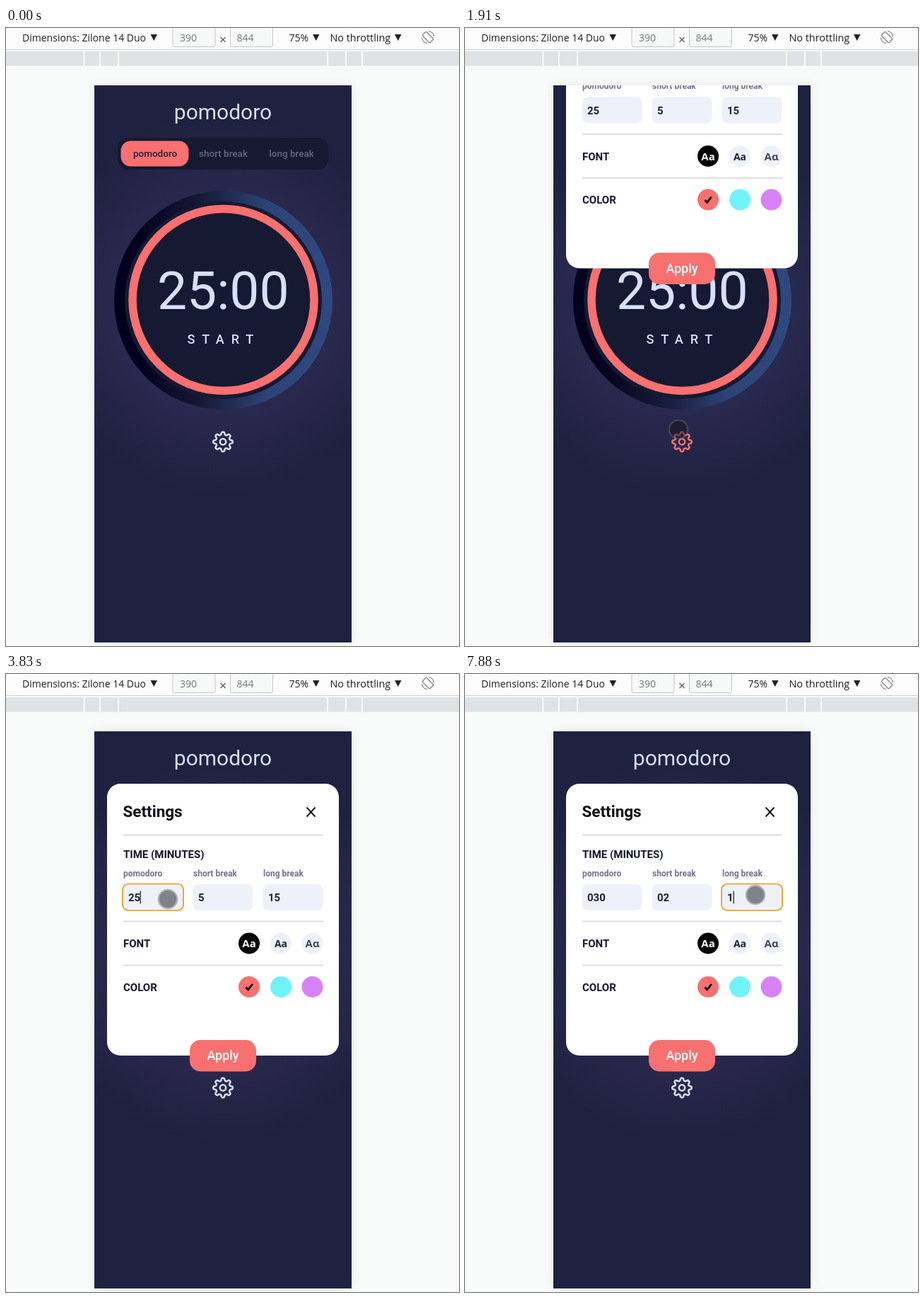
Write an HTML page that moves like this. It is 641 px wide and 873 px high and loops after 8 s.

```html
<!DOCTYPE html>
<html lang="en">
<head>
<meta charset="utf-8">
<title>Pomodoro settings</title>
<style>
html, body { margin: 0; width: 100%; height: 100%; overflow: hidden; background: #f9fbfa; }
svg { display: block; width: 100vw; height: 100vh; font-family: Roboto, sans-serif; }
.bar { font: 14px "Open Sans", sans-serif; fill: #202124; }
.bar .dim { fill: #73767a; }
.tab { font-size: 13.5px; font-weight: 500; fill: #686782; text-anchor: middle; }
.head { font-size: 15px; font-weight: 600; fill: #15172b; }
.label { font-size: 12px; font-weight: 700; fill: #73738a; }
.value { font-size: 15px; font-weight: 700; fill: #1e2138; }
.aa { font-size: 15px; font-weight: 700; text-anchor: middle; }
</style>
</head>
<body>
<svg viewBox="0 0 641 873" preserveAspectRatio="none">
  <defs>
    <radialGradient id="glow" gradientUnits="userSpaceOnUse" cx="307" cy="390" r="270">
      <stop offset="0" stop-color="#2f2f5e"/>
      <stop offset=".55" stop-color="#29294f"/>
      <stop offset="1" stop-color="#1e213f"/>
    </radialGradient>
    <linearGradient id="rim">
      <stop offset="0" stop-color="#02001f"/>
      <stop offset=".12" stop-color="#03011f"/>
      <stop offset=".4" stop-color="#161a36"/>
      <stop offset=".7" stop-color="#2c4376"/>
      <stop offset="1" stop-color="#2f487e"/>
    </linearGradient>
    <filter id="soft" x="-20%" y="-20%" width="140%" height="140%"><feGaussianBlur stdDeviation="8"/></filter>
    <clipPath id="screen"><rect x="125" y="81" width="364" height="787"/></clipPath>
  </defs>

  <rect width="641" height="873" fill="#f9fbfa"/>
  <rect x="125" y="81" width="364" height="787" fill="#000" opacity=".07" filter="url(#soft)"/>

  <g class="bar">
    <rect width="641" height="30" fill="#fbfcfb"/>
    <path d="M0 30.5H641" stroke="#cdd0d2"/>
    <text x="23" y="18.5">Dimensions: Zilone 14 Duo</text>
    <g fill="#f7f8f8" stroke="#c3c5c7">
      <rect x="236" y="-3" width="60" height="29.5" rx="2"/>
      <rect x="317.500" y="-3" width="60" height="29.5" rx="2"/>
    </g>
    <text class="dim" x="246" y="18.500">390</text>
    <text class="dim" x="326.500" y="18.500">844</text>
    <path d="M303.500 13l7 7m0-7l-7 7" stroke="#55585c" stroke-width="1.2"/>
    <text x="400.500" y="18.500">75%</text>
    <text x="458.500" y="18.500" font-size="14.400" style="font-size:14.4px">No throttling</text>
    <path id="arrows"/>
    <g transform="translate(597 13)" fill="none" stroke="#74777b" stroke-width="1.2">
      <rect x="-4" y="-7.500" width="8" height="15" rx="1.500" transform="rotate(-45)"/>
      <path d="M1-8.500A8.500 8.500 0 0 1 8.500-1M-1 8.500A8.500 8.500 0 0 1-8.500 1"/>
    </g>
    <rect y="33" width="641" height="20.500" fill="#dfe3e6"/>
    <path d="M110.500 33v20.500M133 33v20.500M159 33v20.500M455 33v20.500M481 33v20.500M504 33v20.500" stroke="#fafcfb" stroke-width="2"/>
  </g>

  <g clip-path="url(#screen)">
    <rect x="125" y="81" width="364" height="787" fill="url(#glow)"/>
    <text x="307" y="129" font-size="30" fill="#d7e0ff" text-anchor="middle">pomodoro</text>
    <rect x="158" y="155" width="298" height="45" rx="14" fill="#161932"/>
    <rect x="162.500" y="159.500" width="96" height="36" rx="14" fill="#f87070"/>
    <g class="tab">
      <text x="211" y="182" style="fill:#1e213f">pomodoro</text>
      <text x="307.500" y="182">short break</text>
      <text x="404" y="182">long break</text>
    </g>

    <circle cx="307.500" cy="384.500" r="154.500" fill="url(#rim)"/>
    <circle cx="307.500" cy="384.500" r="139.500" fill="#161932"/>
    <circle cx="307.500" cy="384" r="128.500" fill="none" stroke="#f87070" stroke-width="11.500"/>
    <text x="307.300" y="397" font-size="75" fill="#d7e0ff" text-anchor="middle">25:00</text>
    <text x="256.500" y="446" font-size="18" font-weight="500" letter-spacing="9.800" fill="#d7e0ff">START</text>

    <g id="gear" fill="none" stroke-width="2.500" stroke-linejoin="round">
      <path id="teeth"/>
      <circle cx="307" cy="584.500" r="4.200"/>
    </g>

    <g id="modal">
      <rect x="143" y="155" width="328" height="384" rx="19" fill="#fff"/>
      <text x="165.500" y="202" font-size="22.500" font-weight="700" fill="#0d0e14">Settings</text>
      <path d="M425.500 188.500l12 13m0-13l-12 13" stroke="#111" stroke-width="1.900"/>
      <path d="M166 227.500H449M166 349.500H449M166 411.500H449" stroke="#d3d3d5" stroke-width="1.600"/>
      <text class="head" x="166" y="259.500">TIME (MINUTES)</text>
      <text class="head" x="166" y="386">FONT</text>
      <text class="head" x="166" y="447.500">COLOR</text>
      <g id="fields"></g>
      <rect id="focus" y="296.500" width="86" height="37.500" rx="8" fill="none" stroke="#e59a17" stroke-width="1.700"/>
      <rect id="caret" y="306.500" width="1.300" height="18" fill="#1e2138"/>

      <circle cx="344" cy="380.500" r="15"/>
      <circle cx="389" cy="380.500" r="15" fill="#eff1fa"/>
      <circle cx="433.500" cy="380.500" r="15" fill="#eff1fa"/>
      <g class="aa">
        <text x="344" y="386" fill="#fff" font-family="Open Sans, sans-serif">Aa</text>
        <text x="389" y="386" fill="#1e213f" font-family="Noto Sans, sans-serif" font-size="14">Aa</text>
        <text x="433.500" y="386" fill="#44465c" font-family="Noto Sans, sans-serif" style="font-weight:600">Aɑ</text>
      </g>
      <circle cx="344" cy="442" r="15" fill="#f87070"/>
      <circle cx="389" cy="442" r="15" fill="#70f3f8"/>
      <circle cx="433.500" cy="442" r="15" fill="#d881f8"/>
      <path d="M339.500 442.500l3.200 3.500 6-8" fill="none" stroke="#000" stroke-width="2.700"/>

      <rect x="260" y="517" width="94" height="44.500" rx="15" fill="#f87070"/>
      <text x="307" y="545" font-size="18" font-weight="500" fill="#fff" text-anchor="middle">Apply</text>
    </g>
  </g>

  <g id="cursor">
    <circle id="dot" r="12"/>
    <circle id="halo" r="13" fill="none" stroke-width="2.500"/>
  </g>
</svg>
<script>
const LOOP = 8000;
const $ = id => document.getElementById(id);
const set = (el, attrs) => { for (const k in attrs) el.setAttribute(k, attrs[k]); };
const show = (el, on) => { el.style.display = on ? '' : 'none'; };

// Each list holds [start, value]; the last one started counts.
const at = (list, t) => list.reduce((v, [start, value]) => t >= start ? value : v, null);

const fields = [
  { x: 166, label: 'pomodoro', values: [[0, '25'], [3890, '2'], [3960, '0'], [4360, '03'], [4620, '030']] },
  { x: 265, label: 'short break', values: [[0, '5'], [6080, '0'], [6280, '02']] },
  { x: 364, label: 'long break', values: [[0, '15'], [7880, '1']] }
];
const focus = [[2730, 165], [5550, 264], [7280, 363]];
const caret = [
  [2730, 189.5], [3300, 0], [3760, 189.5], [3890, 181], [4360, 189.5], [4620, 198], [5080, 0],
  [5550, 280], [6280, 288.5], [6740, 0], [7280, 388], [7810, 0], [7880, 379.5]
];
const clicks = [[1400, 1600], [2680, 2770], [5520, 5610], [7250, 7340]];
const path = [
  [200, 542, 843], [500, 440, 560], [880, 323, 267], [1010, 323, 267], [1280, 308, 605],
  [1420, 301, 570], [1560, 301, 570], [1910, 302, 567], [2190, 275, 353], [2400, 242, 312],
  [2660, 229, 318], [5080, 229, 318], [5520, 318, 312], [6740, 318, 312], [7240, 411, 312], [8000, 411, 312]
];

function cursorAt(t) {
  const i = Math.max(1, path.findIndex(p => p[0] > t));
  const [t0, x0, y0] = path[i - 1], [t1, x1, y1] = path[i];
  const u = (t - t0) / (t1 - t0), k = u * u * (3 - 2 * u);
  return [x0 + (x1 - x0) * k, y0 + (y1 - y0) * k];
}

// The CSS "ease" curve.
function ease(x) {
  if (x <= 0) return 0;
  if (x >= 1) return 1;
  const bez = (u, a, b) => 3 * u * (1 - u) * (1 - u) * a + 3 * u * u * (1 - u) * b + u * u * u;
  let lo = 0, hi = 1;
  for (let i = 0; i < 24; i++) {
    const mid = (lo + hi) / 2;
    if (bez(mid, .25, .25) < x) lo = mid; else hi = mid;
  }
  return bez(lo, .1, 1);
}

function build() {
  $('arrows').setAttribute('d', [204.5, 434, 550].map(x => `M${x} 9h9.500l-4.750 9z`).join(''));
  $('teeth').setAttribute('d', 'M' + Array.from({ length: 160 }, (_, i) => {
    const a = i / 160 * 2 * Math.PI;
    const r = 11.9 + 1.8 * Math.tanh(1.8 * Math.cos(8 * a)) / Math.tanh(1.8);
    return `${(307 + r * Math.cos(a)).toFixed(2)} ${(584.5 + r * Math.sin(a)).toFixed(2)}`;
  }).join('L') + 'Z');
  $('fields').innerHTML = fields.map(f => `
    <text class="label" x="${f.x}" y="285.500">${f.label}</text>
    <rect x="${f.x - .5}" y="297" width="85" height="37" rx="8" fill="#eff1fa"/>
    <text class="value" x="${f.x + 7}" y="321"></text>`).join('');
  fields.forEach((f, i) => { f.el = document.querySelectorAll('.value')[i]; });
}

function render(t) {
  const slide = ease((t - 1615) / 737);
  show($('modal'), slide > 0);
  $('modal').setAttribute('transform', `translate(0 ${(633 * (slide - 1)).toFixed(2)})`);
  $('gear').setAttribute('stroke', t >= 1560 && t < 3000 ? '#f87070' : '#d7e0ff');

  for (const f of fields) f.el.textContent = at(f.values, t);
  const fx = at(focus, t), cx = at(caret, t);
  show($('focus'), fx);
  show($('caret'), cx);
  set($('focus'), { x: fx || 0 });
  set($('caret'), { x: cx || 0 });

  show($('cursor'), t >= 200);
  if (t < 200) return;
  const [x, y] = cursorAt(t);
  const down = clicks.some(([a, b]) => t >= a && t < b);
  $('cursor').setAttribute('transform', `translate(${x.toFixed(2)} ${y.toFixed(2)})`);
  $('dot').setAttribute('fill', down ? 'rgba(140,140,15,.92)' : 'rgba(20,20,25,.5)');
  $('halo').setAttribute('stroke', down ? 'rgba(160,158,35,.9)' : 'rgba(95,95,100,.45)');
}

build();
const begin = performance.now();
(function tick() {
  render((performance.now() - begin) % LOOP);
  requestAnimationFrame(tick);
})();
</script>
</body>
</html>
```
